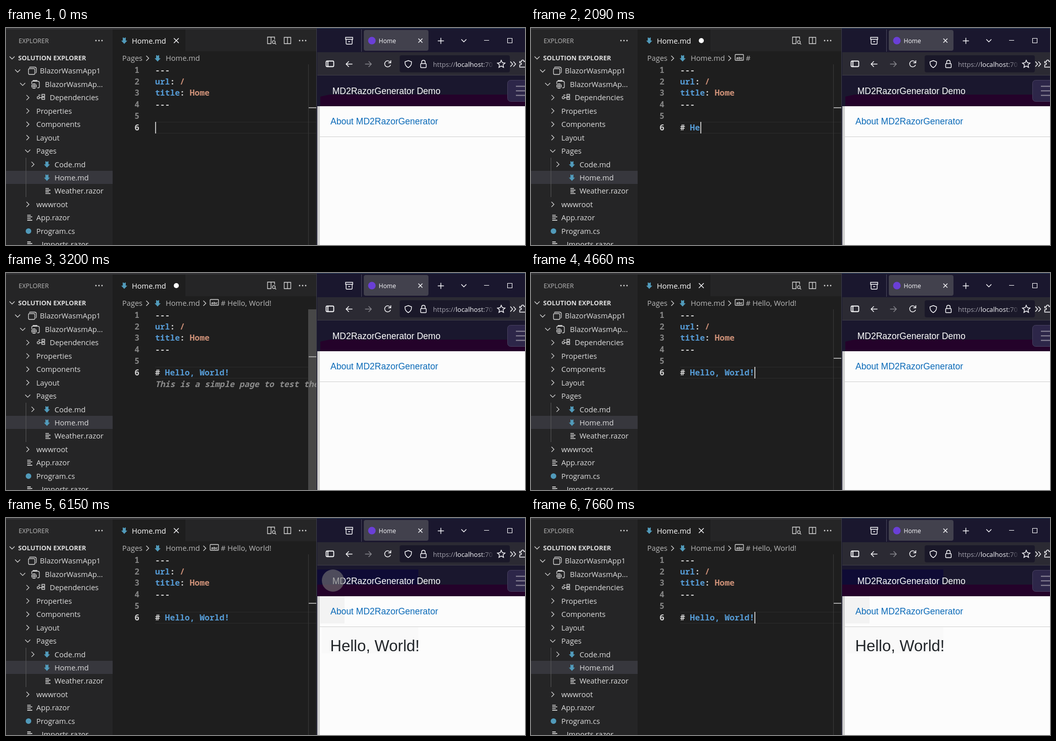
An HTML page that plays this animation: 1027 px wide and 430 px high, repeating every 8000 ms.

```html
<!DOCTYPE html>
<html lang="en">
<head>
<meta charset="utf-8">
<title>Markdown page demo</title>
<style>
html, body { margin: 0; width: 100%; height: 100%; overflow: hidden; background: #1e1e1e; }
svg { display: block; width: 1027px; height: 430px; }
text { white-space: pre; }
.ui { font: 500 14.6px "Open Sans", "Noto Sans", sans-serif; fill: #dedede; }
.code { font: 600 16.33px "Noto Sans Mono", "DejaVu Sans Mono", monospace; fill: #d4d4d4; }
.web { font: 17.5px "Liberation Sans", Arial, sans-serif; }
.line { fill: none; stroke: #d4d4d4; stroke-width: 1.3; }
.light { fill: none; stroke: #fbfbfe; stroke-width: 1.4; }
.b { font-weight: bold; }
.dim { fill: #b8b8b8; }
.blue { fill: #569cd6; }
.orange { fill: #ce9178; }
.ghost { fill: #8c8c8c; font-style: italic; font-weight: 600; }
</style>
</head>
<body>
<svg id="stage" viewBox="0 0 1027 430" xmlns="http://www.w3.org/2000/svg"></svg>
<script>
const LOOP = 8000, CHAR = 9.8, CODE_X = 295;
const stage = document.getElementById('stage');

const rect = (x, y, w, h, fill, extra = '') =>
  `<rect x="${x}" y="${y}" width="${w}" height="${h}" fill="${fill}" ${extra}/>`;
const text = (x, y, s, cls = 'ui', extra = '') =>
  `<text x="${x}" y="${y}" class="${cls}" ${extra}>${s}</text>`;
const path = (d, cls = 'line', extra = '') => `<path d="${d}" class="${cls}" ${extra}/>`;
const group = (id, s) => `<g id="${id}">${s}</g>`;

const right = (x, y) => path(`M${x - 2.5} ${y - 5}l5 5-5 5`);
const down = (x, y, cls) => path(`M${x - 5} ${y - 2.5}l5 5 5-5`, cls);
const cross = (x, y, r, cls) =>
  path(`M${x - r} ${y - r}l${2 * r} ${2 * r}m0 ${-2 * r}l${-2 * r} ${2 * r}`, cls);
const dots = (x, y) => [-6, 0, 6].map(d => `<circle cx="${x + d}" cy="${y}" r="1.4" fill="#d4d4d4"/>`).join('');
const arrow = (x, y) =>
  `<path transform="translate(${x} ${y})" fill="#519aba" d="M-3-6.5L0-5 3-6.5V0H6L0 6.5-6 0H-3Z"/>`;
const lines = (x, y) => path(`M${x - 4} ${y - 5}h7m-7 3.3h10m-10 3.3h7m-7 3.3h10`, 'line', 'style="stroke-width:1.6"');

function explorer() {
  const rowY = i => 85 + i * 26.45;
  let s = rect(0, 0, 211, 430, '#252526') + rect(0, 283, 211, 26, '#37373d');
  s += text(25, 30, 'EXPLORER', 'ui dim', 'style="font-size:12.4px"') + dots(184, 25);
  s += down(12, 59) + text(24, 63.6, 'SOLUTION EXPLORER', 'ui b', 'style="font-size:12.8px"');
  s += rect(39, 257, 1, 78, '#585858');

  const rows = [
    [67, 'BlazorWasmApp1', 23, 1], [77, 'BlazorWasmAp...', 33, 1], [86.5, 'Dependencies', 43],
    [60, 'Properties', 43], [60, 'Components', 43], [60, 'Layout', 43], [60, 'Pages', 43, 1],
    [96, 'Code.md', 53], [96, 'Home.md'], [96, 'Weather.razor'], [60, 'wwwroot', 43],
    [60, 'App.razor'], [60, 'Program.cs'], [64, '_Imports.razor']
  ];
  rows.forEach(([x, name, cx, open], i) => {
    s += text(x, Math.round(rowY(i) + 5.4), name);
    if (cx) s += open ? down(cx, rowY(i)) : right(cx, rowY(i));
  });
  // project, web app and dependency icons
  s += path('M46.5 80.5h8.5q2 0 2 2v7.5q0 2-2 2h-8.5q-2 0-2-2v-7.5q0-2 2-2M46 78.5q1-1 2.5-1h8q3.5 0 3.5 3.5v6q0 2-1.5 2.5');
  s += path('M51 111v-3.5q0-2 2-2h10q3 0 3 3v8q0 2-2 2h-2M53 104h9');
  s += '<circle cx="55.5" cy="115" r="4.5" class="line"/>' + path('M51 115h9m-4.5-4.5v9');
  s += '<circle cx="64" cy="138" r="2.3" class="line"/>' + path('M66.5 138h4M64 133h4M71 131.5h5.5v4H71ZM71 137.5h5.5v4H71Z');
  s += arrow(81, rowY(7)) + arrow(81, rowY(8));
  s += lines(82, rowY(9)) + lines(46, rowY(11)) + lines(46, rowY(13));
  s += `<circle cx="44.5" cy="${rowY(12)}" r="5.5" fill="#519aba"/>`;
  return s;
}

function editor() {
  let s = rect(211, 0, 404, 430, '#1e1e1e') + rect(355, 3, 260, 43, '#252526');
  s += arrow(234, 25) + text(249, 31, 'Home.md', 'ui', 'style="fill:#ffffff"');
  s += group('close', cross(337, 25, 4.8, 'light'));
  s += '<circle id="dirty" cx="337" cy="25" r="5" fill="#ffffff"/>';
  s += path('M525 31h-7.500V18h14v5M524.500 18v13') + '<circle cx="530" cy="28" r="2.800" class="line"/>' + path('M532 30l2.500 2.500');
  s += path('M550.500 18.500h13v12.500h-13ZM557 18.500v12.500') + dots(587, 25);

  s += text(230, 65, 'Pages', 'ui dim') + right(280, 60);
  s += arrow(300, 60) + text(316, 65, 'Home.md', 'ui dim');
  s += group('crumb', right(393, 60) + path('M405 52.5h14.5q1 0 1 1v9.5q0 1-1 1H405q-1 0-1-1v-9.5q0-1 1-1')
    + text(406, 61.5, 'abc', 'ui b', 'style="font-size:7.5px"')
    + text(425, 65, '', 'ui dim', 'id="crumbText"'));

  s += rect(295, 186, 319, 1, '#2b2b2b') + rect(295, 208, 319, 1, '#2b2b2b');
  s += rect(598, 72, 1, 358, '#3a3a3a');
  s += rect(598, 72, 17, 358, '#474747', 'id="slider"');
  s += rect(599, 157, 15, 2, '#a0a0a0', 'id="mark"');

  const base = i => Math.round(88.6 + i * 22.9);
  for (let i = 0; i < 6; i++)
    s += text(264, base(i), i + 1, 'code', `text-anchor="end" style="fill:${i < 5 ? '#858585' : '#d0d0d0'}"`);
  const pair = (k, v) => `<tspan class="blue">${k}</tspan>: <tspan class="orange">${v}</tspan>`;
  s += ['---', pair('url', '/'), pair('title', 'Home'), '---']
    .map((c, i) => text(CODE_X, base(i), c, 'code')).join('');
  s += text(CODE_X, base(5), '<tspan id="hash"></tspan><tspan id="head" class="blue"></tspan><tspan id="hint" class="ghost"></tspan>', 'code b');
  s += text(CODE_X, base(6), 'This is a simple page to test the', 'code ghost', 'id="next"');
  s += rect(0, 186, 2, 23, '#bdbdbd', 'id="caret"');
  return s;
}

function browser() {
  let s = rect(615, 0, 412, 430, '#1a172e') + rect(616, 48, 411, 46, '#2b2a33');
  s += rect(614, 0, 1, 430, '#3c3d48') + rect(615, 0, 412, 1, '#2c4560');
  s += rect(703, 3, 1, 44, '#4a485c') + rect(708, 4, 128, 41, '#42414d', 'rx="4"');
  s += path('M672 18.5h14v4h-14ZM673 22.5v8q0 1.5 1.5 1.5h9q1.5 0 1.5-1.5v-8M677 27h4', 'light');
  s += '<circle cx="724" cy="25" r="7.5" fill="#6a3fd6"/>';
  s += text(737.5, 30, 'Home', 'ui', 'style="font-size:12.1px;fill:#fbfbfe"') + cross(820, 25, 4, 'light');
  s += path('M854.5 25.5h12m-6-6v12', 'light') + down(906, 25, 'light');
  s += path('M946 24.5h10M992.5 20.5h9v9h-9Z', 'light', 'style="stroke-width:1.1"');

  s += path('M635.5 65.5h11q2 0 2 2v7q0 2-2 2h-11q-2 0-2-2v-7q0-2 2-2M637 66v10', 'light', 'style="stroke-width:1.8"');
  s += path('M685.5 71.5H673m5.5-5.5l-5.5 5.5 5.5 5.5', 'light');
  s += path('M710.5 71.5H723m-5.5-5.5l5.5 5.5-5.5 5.5', 'light', 'opacity=".45"');
  s += path('M760.5 68a6 6 0 1 0 .5 5M761.5 64v5h-5', 'light');
  s += rect(779, 54, 218, 34, '#1a1829', 'rx="4"');
  s += path('M796 64.5l6.5 2.5q.5 8-6.5 11.5q-7-3.5-6.5-11.5Z', 'light');
  s += path('M821.5 70.5h9q1 0 1 1v6q0 1-1 1h-9q-1 0-1-1v-6q0-1 1-1M822.5 70.5v-3q0-3.5 3.5-3.5t3.5 3.5v3', 'light');
  s += text(845, 76.5, 'https://<tspan fill="url(#fade)">localhost:70</tspan>', 'ui', 'style="font-size:13.1px;fill:#a3a2ad"');
  s += path('M980 64l2.2 4.8 5.3.6-4 3.5 1.1 5.2-4.6-2.7-4.6 2.7 1.1-5.2-4-3.5 5.3-.6Z', 'light');
  s += path('M998 66.5l4.5 5-4.5 5m6-10l4.5 5-4.5 5', 'light');
  s += path('M1027 77.5h-10.5V73q3.5 0 3.5-2t-3.5-2v-2.5h3.5q0-3 2.5-3t2.5 3h2', 'light');
  s += rect(616, 93, 411, 1, '#403e49');

  // page
  s += rect(616, 155, 411, 275, '#fcfcfc') + '<path fill="#24022a" d="M622 136L640 132H1027V155H622Z"/>';
  s += rect(616, 155, 5, 275, '#cfcfcf');
  s += group('patch', rect(616, 102, 200, 30, '#0f0b35') + rect(616, 132, 377, 23, '#24022a')
    + rect(622, 155, 48, 54, '#f3f3f3') + rect(625, 216, 191, 52, '#f9f9f9'));
  s += rect(616, 215, 411, 1, '#d0d0d0');
  s += rect(992.5, 103.5, 60, 42, '#2d2649', 'rx="6" stroke="#484160"');
  s += path('M1009 115.5h18m-18 9h18m-18 9h18', 'line', 'style="stroke:#8d8799;stroke-width:2"');
  s += text(645.7, 131, 'MD2RazorGenerator Demo', 'web', 'fill="#ffffff"');
  s += text(642, 191, 'About MD2RazorGenerator', 'web', 'fill="#0a6ab8"');
  s += text(641.5, 264, 'Hello, World!', 'web', 'id="hello" fill="#212529" style="font-size:31px"');
  s += group('badge', '<circle cx="647" cy="124" r="22" fill="#757575"/>'
    + '<path id="tick" d="M637 124.5L644.5 133 658.5 114.5" fill="none" stroke="#ffffff" stroke-width="5" pathLength="1" stroke-dasharray="1 2"/>');
  return s;
}

stage.innerHTML = '<defs><linearGradient id="fade" gradientUnits="userSpaceOnUse" x1="938" x2="966">'
  + '<stop stop-color="#fbfbfe"/><stop offset="1" stop-color="#1a1829"/></linearGradient></defs>'
  + editor() + explorer() + rect(0, 0, 615, 3, '#333336') + browser();

const el = {};
stage.querySelectorAll('[id]').forEach(n => el[n.id] = n);

// [time, hash, heading, hint]
const typing = [
  [0, '', '', ''], [1020, '#', '', ''], [1140, '#', '', ' Welcome to the Home Page'],
  [1320, '# ', '', 'Welcome to the Home Page'], [1860, '# ', 'H', ''], [2090, '# ', 'He', ''],
  [2190, '# ', 'Hel', ''], [2250, '# ', 'Hell', ''], [2310, '# ', 'Hello', ''],
  [2400, '# ', 'Hello', ', World!'], [2710, '# ', 'Hello, World!', '']
];
const caretFlips = [370, 840, 3200, 3690, 4170, 4660, 5140, 5630, 6150, 6660, 7120, 7660];
const sliderSteps = [[0, 0], [2710, .5], [2770, 1], [3320, .6], [3690, .25], [3810, 0]];

const at = (list, t) => list.filter(r => r[0] <= t).pop();
const ramp = (t, a, b) => Math.min(1, Math.max(0, (t - a) / (b - a)));
const show = (node, on) => node.setAttribute('visibility', on ? 'visible' : 'hidden');

function draw(t) {
  const [, hash, head, hint] = at(typing, t);
  el.hash.textContent = hash;
  el.head.textContent = head;
  el.hint.textContent = hint;
  el.caret.setAttribute('x', Math.round(CODE_X + (hash.length + head.length) * CHAR + .3));
  show(el.caret, caretFlips.filter(f => f <= t).length % 2 === 0);

  const dirty = t >= 1020 && t < 3810;
  show(el.dirty, dirty);
  show(el.close, !dirty);
  show(el.crumb, t >= 1690);
  el.crumbText.textContent = t < 1690 ? '' : t < 3020 ? '#' : '# Hello, World!';
  show(el.next, t >= 2770 && t < 3320);
  el.slider.setAttribute('opacity', at(sliderSteps, t)[1]);
  el.mark.setAttribute('y', t < 2710 ? 157 : t < 3320 ? 165 : 168);

  show(el.patch, t >= 5970);
  show(el.hello, t >= 5970);
  el.badge.setAttribute('opacity', ramp(t, 5940, 6280) * (1 - ramp(t, 7260, 7660)));
  const drawn = ramp(t, 6300, 6620);
  show(el.tick, drawn > 0);
  el.tick.setAttribute('stroke-dashoffset', 1 - drawn);
}

const start = performance.now();
function tick(now) {
  draw(Math.max(0, now - start) % LOOP);
  requestAnimationFrame(tick);
}
draw(0);
requestAnimationFrame(tick);
</script>
</body>
</html>
```
